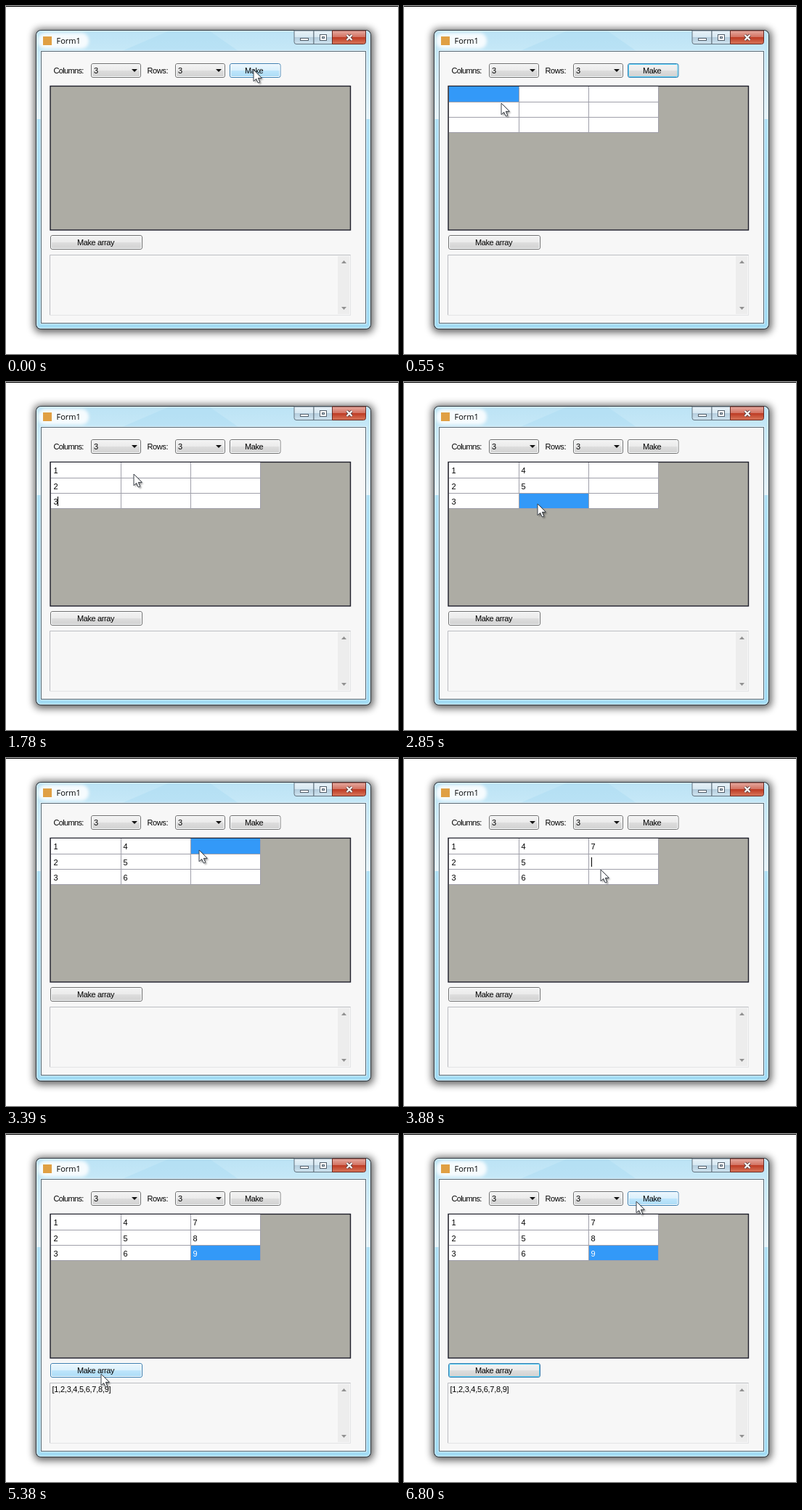
Write an HTML page that moves like this. It is 540 px wide and 480 px high and loops after 7.06 s.

```html
<!DOCTYPE html>
<html lang="en">
<head>
<meta charset="utf-8">
<title>Grid to array</title>
<style>
html, body { margin: 0; width: 100%; height: 100%; overflow: hidden; background: #fff; }
svg { display: block; width: 540px; height: 480px; }
text { font: 11px "Liberation Sans", Arial, sans-serif; letter-spacing: -.4px; fill: #000; white-space: pre; }
.title { font: 11px "Open Sans", "Noto Sans", sans-serif; letter-spacing: 0; }
.line { shape-rendering: crispEdges; }
</style>
</head>
<body>
<svg id="stage" viewBox="0 0 540 480" xmlns="http://www.w3.org/2000/svg">
  <defs>
    <linearGradient id="glass" x2="0" y2="1">
      <stop stop-color="#bce3f5"/><stop offset=".07" stop-color="#c6e8f7"/>
      <stop offset=".297" stop-color="#e6f4fb"/><stop offset=".297" stop-color="#b0e0f6"/>
      <stop offset="1" stop-color="#a3dcf5"/>
    </linearGradient>
    <filter id="soft" x="-20%" y="-20%" width="140%" height="140%"><feGaussianBlur stdDeviation="5.5"/></filter>
    <filter id="glow" x="-30%" y="-60%" width="160%" height="220%"><feGaussianBlur stdDeviation="2"/></filter>
    <filter id="tiny" x="-30%" y="-30%" width="160%" height="160%"><feGaussianBlur stdDeviation=".9"/></filter>
    <clipPath id="frame"><rect x="42" y="34" width="460" height="411" rx="6"/></clipPath>
    <path id="arrow" d="M0 0V15.8L3.7 12.4L6.2 18L8.7 16.9L6.3 11.4H11.3Z"/>
  </defs>
</svg>
<script>
const NS = "http://www.w3.org/2000/svg", LOOP = 7060;
const stage = document.getElementById("stage");

function add(tag, attrs, parent = stage) {
  const el = document.createElementNS(NS, tag);
  for (const k in attrs) el.setAttribute(k, attrs[k]);
  return parent.appendChild(el);
}
const rect = (x, y, width, height, fill, more, parent) =>
  add("rect", { x, y, width, height, fill, ...more }, parent);
const path = (d, fill, more, parent) => add("path", { d, fill, ...more }, parent);
function text(x, y, str, more, parent) {
  const el = add("text", { x, y, ...more }, parent);
  el.textContent = str;
  return el;
}
const show = (el, on) => el.setAttribute("visibility", on ? "visible" : "hidden");

// Two-part vertical gradient with a hard break in the middle
function gloss(id, ...colors) {
  const g = add("linearGradient", { id, x2: 0, y2: 1 });
  colors.forEach((c, i) => add("stop", { offset: Math.ceil(i / 2) / 2, "stop-color": c }, g));
}
gloss("normal", "#f3f3f3", "#ebebeb", "#dedede", "#d0d0d0");
gloss("hover", "#ecf7fd", "#daf0fc", "#bfe6fc", "#a9daf5");
gloss("pressed", "#dcf0fa", "#c0e3f4", "#98d1ef", "#70b8de");
gloss("caption", "#e9f3f9", "#d6e7f1", "#b5cddd", "#cfe4f0");
gloss("close", "#e7aca2", "#d2705f", "#bd3a23", "#d9785c");

function button(x, y, w, h, label, tx) {
  const face = rect(x + .5, y + .5, w - 1, h - 1, "", { rx: 2.5 });
  const ring = rect(x + 1.5, y + 1.5, w - 3, h - 3, "none", { rx: 1.5 });
  text(tx, y + 14, label);
  return mode => {
    face.setAttribute("fill", `url(#${mode === "focus" ? "normal" : mode})`);
    face.setAttribute("stroke", mode === "normal" ? "#707070" : "#3c7fb1");
    ring.setAttribute("stroke", mode === "focus" ? "#55cdf3" : mode === "pressed" ? "#8fbdd4" : "#fbfdfe");
  };
}
function combo(x) {
  button(x, 79, 69, 20, "3", x + 4)("normal");
  path(`M${x + 56} 87h8l-4 4z`, "#111");
}

// Window frame
rect(0, 0, 540, 1, "#000");
rect(39, 32, 467, 418, "#000", { rx: 8, filter: "url(#soft)", opacity: .65 });
rect(41, 33, 462, 413, "#2f3a42", { rx: 7 });
const glass = add("g", { "clip-path": "url(#frame)" });
rect(42, 34, 460, 411, "url(#glass)", {}, glass);
path("M160 62L225 34H280L320 62Z", "#a9daf2", { opacity: .45 }, glass);
rect(44, 37, 70, 22, "#fff", { rx: 10, filter: "url(#glow)", opacity: .85 }, glass);
rect(42.5, 34.5, 459, 410, "none", { rx: 6, stroke: "#effaff", "stroke-opacity": .7 });
rect(51, 42, 12, 12, "#e0a044");
text(69.5, 52, "Form1", { class: "title" });

// Caption buttons
path("M397 34H424V52.5H400Q397 52.5 397 49.5Z", "url(#caption)", { stroke: "#62737f" });
rect(424, 34, 25.5, 18.5, "url(#caption)", { stroke: "#62737f" });
path("M449.5 34H495.5V49.5Q495.5 52.5 492.5 52.5H449.5Z", "url(#close)", { stroke: "#6b2a22" });
rect(405.5, 44.5, 11, 3, "#fff", { stroke: "#54606c" });
rect(432.5, 39.5, 9, 8, "#fff", { stroke: "#54606c" });
rect(435.5, 42.5, 3, 2, "#c5d8e5", { stroke: "#54606c" });
const cross = "M469.5 40L476.5 47M476.5 40L469.5 47";
path(cross, "none", { stroke: "#5f4444", "stroke-width": 4 });
path(cross, "none", { stroke: "#fff", "stroke-width": 2.2 });

// Client area
rect(47.5, 61.5, 449, 377, "none", { stroke: "#fff", "stroke-opacity": .5 });
rect(48.5, 62.5, 447, 375, "#f7f7f7", { stroke: "#586a75" });
text(65.5, 93, "Columns:", { style: "letter-spacing:-.65px" });
combo(117);
text(194.5, 93, "Rows:");
combo(233);
const make = button(308, 79, 70.5, 20, "Make", 329);
rect(61, 110.5, 413.5, 198.5, "#adaca4", { stroke: "#1e1f2b", "stroke-width": 1.4 });
const makeArray = button(61, 316, 127, 20, "Make array", 98);

rect(60.5, 343.5, 414, 83, "#f7f7f7", { stroke: "#e3e4e6" });
path("M60.5 426V343.5H474.5", "none", { stroke: "#bcbec2" });
rect(457, 345, 16, 80, "#ededed");
path("M462 355h7l-3.5 -4z M462 415h7l-3.5 4z", "#909090");
const output = text(63.5, 356, "[1,2,3,4,5,6,7,8,9]", { style: "letter-spacing:-.25px" });

// Grid cells, filled column by column
const table = add("g", {}), cells = [];
rect(62, 111, 289, 64, "#fff", {}, table);
for (let i = 0; i < 9; i++) {
  const x = 62 + 96 * Math.floor(i / 3), y = 111 + 21.5 * (i % 3);
  cells.push({
    x,
    back: rect(x, y, 96, 21, "#3399f8", {}, table),
    digit: text(x + 3.5, y + 15, i + 1, {}, table),
    caret: rect(0, y + 4, 1, 13, "#000", { class: "line" }, table)
  });
}
for (let k = 1; k < 4; k++)
  path(`M62 ${111.5 + 21 * k}H351M${62.5 + 96 * k} 111V175`, "none", { stroke: "#a0a0aa", class: "line" }, table);

const pointer = add("g", {});
add("use", { href: "#arrow", x: 2, y: 2, fill: "#000", opacity: .45, filter: "url(#tiny)" }, pointer);
add("use", { href: "#arrow", fill: "#fff", stroke: "#3a4048" }, pointer);

// Timing: cells are picked at an even pace, then edited, then typed into
const SHOWN = 130, PRESS = 5250, RESULT = 5370;
const picked = i => 1980 + 435 * (i - 3);
const bursts = [130, 860, 1180, 1980, 2790, 3510, 4250, 5250, 6310];

// Pointer stops: time, x, y
const stops = [[0, 341, 88], [SHOWN, 341, 88], [550, 134, 134], [730, 124, 124]];
function rest(from, to, x, y) {
  stops.push([from, x, y], [to, x, y]);
}
for (let i = 1; i < 9; i++) {
  const row = i % 3, x = [122, 176, 266][(i - row) / 3];
  rest(picked(i) - 200, picked(i) + 100, x + 4 * row, 127 + 20.5 * row);
}
stops.push([4790, 133, 340]);
rest(4920, 6310, 131, 331);
rest(6790, LOOP, 320, 93);

// The picture advances in short ticks within each burst
function snap(t) {
  const a = bursts.findLast(b => b <= t) ?? 0;
  return a + 60 * Math.floor(Math.min(t - a, 670) / 60);
}
function pointerAt(t) {
  const i = stops.findIndex(s => s[0] > t);
  const [t0, x0, y0] = stops[i - 1], [t1, x1, y1] = stops[i];
  const u = (t - t0) / (t1 - t0), e = u * u * (3 - 2 * u);
  return [Math.round(x0 + (x1 - x0) * e), Math.round(y0 + (y1 - y0) * e)];
}

function draw(now) {
  const t = snap(now % LOOP), [x, y] = pointerAt(t);
  const over = (l, top, r, b) => x >= l && x < r && y >= top && y < b;
  const mode = (hot, down, focus) => hot ? (down ? "pressed" : "hover") : focus ? "focus" : "normal";
  pointer.setAttribute("transform", `translate(${x} ${y})`);

  make(mode(over(308, 79, 379, 99), t === SHOWN, t >= SHOWN && t < 730));
  makeArray(mode(over(61, 316, 188, 336), t >= PRESS && t < RESULT, t >= PRESS));
  show(output, t >= RESULT);
  show(table, t >= SHOWN);

  cells.forEach((c, i) => {
    const start = picked(i), typed = t >= start + 190;
    const active = t >= (i ? start : SHOWN) && (i === 8 || t < picked(i + 1));
    const editing = active && t >= start + 130 && t < PRESS;
    show(c.back, active && !editing);
    show(c.digit, typed);
    show(c.caret, editing);
    c.digit.style.fill = active && !editing ? "#fff" : "#000";
    c.caret.setAttribute("x", c.x + (typed ? 9 : 4));
  });
}

const begin = performance.now();
function frame() {
  draw(performance.now() - begin);
  requestAnimationFrame(frame);
}
frame();
</script>
</body>
</html>
```
